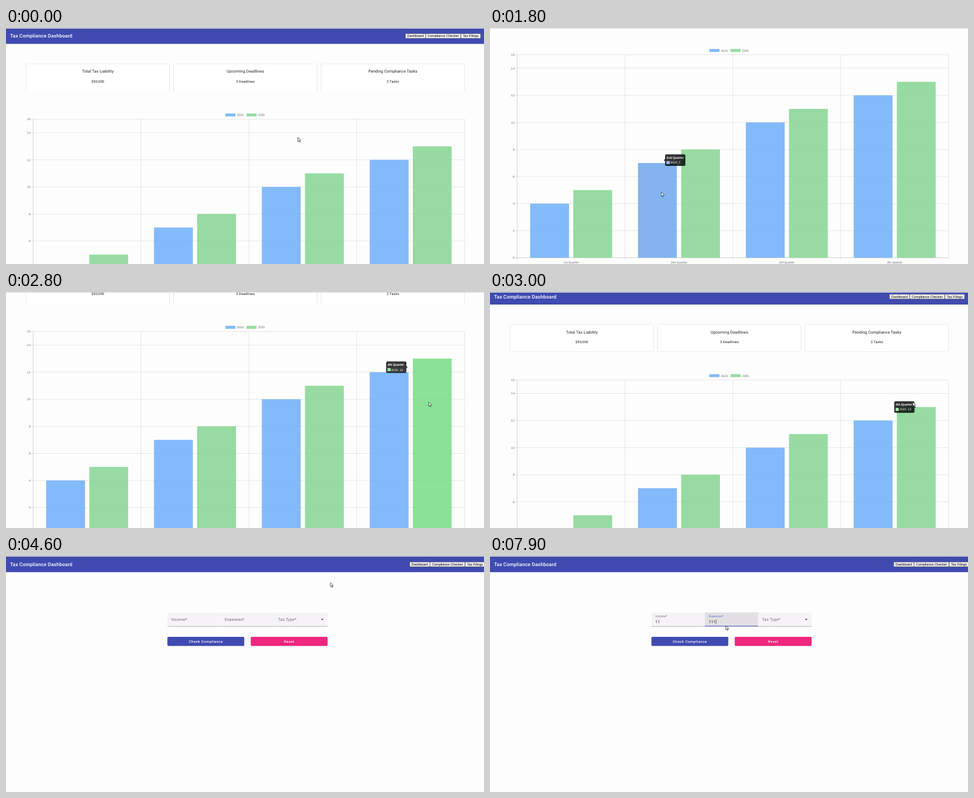
An HTML page for the animation above (8000 ms loop, 800 px wide and 397 px high).

```html
<!DOCTYPE html>
<html lang="en">
<head>
<meta charset="utf-8">
<title>Tax Compliance Dashboard</title>
<style>
  html, body { margin: 0; width: 100%; height: 100%; overflow: hidden; background: #fefdfe; }
  svg { display: block; width: 100%; height: 100%; }
  text { font-family: Roboto, sans-serif; text-rendering: geometricPrecision; white-space: pre; }
  .mid { text-anchor: middle; }
  .brand { font-size: 8.33px; font-weight: 500; letter-spacing: .1px; fill: #fff; }
  .nav, .tick, .tip { font-family: "Liberation Sans", Arial, sans-serif; }
  .nav { font-size: 5.6px; fill: #000; }
  .head { font-size: 6.67px; letter-spacing: .09px; fill: #1c1c1c; }
  .fact { font-size: 5.83px; letter-spacing: .104px; fill: #1c1c1c; }
  .tick { font-size: 5.1px; fill: #666; }
  .tip { font-size: 5.1px; fill: #fff; }
  .field { font-size: 6.67px; letter-spacing: .208px; }
  .action { font-size: 5.83px; font-weight: 500; letter-spacing: .52px; fill: #fff; }
  .card { fill: #fff; filter: drop-shadow(0 .6px .5px rgba(0,0,0,.34)); }
  .raised { filter: drop-shadow(0 .5px .5px rgba(0,0,0,.3)); }
  .grid { stroke: rgba(0,0,0,.09); }
  .axis { stroke: rgba(0,0,0,.16); }
</style>
</head>
<body>
<svg id="stage" viewBox="0 0 800 397"></svg>
<script>
const LOOP = 8000, STEP = 100;
const INDIGO = '#3f4bb0';
const stage = document.getElementById('stage');

function add(parent, tag, attrs = {}, text) {
  const node = document.createElementNS('http://www.w3.org/2000/svg', tag);
  set(node, attrs);
  if (text !== undefined) node.textContent = text;
  return parent.appendChild(node);
}
function set(node, attrs) {
  for (const key in attrs) node.setAttribute(key, attrs[key]);
}
const box = (parent, x, y, width, height, attrs) =>
  add(parent, 'rect', { x, y, width, height, ...attrs });
const label = (parent, x, y, cls, text, attrs) =>
  add(parent, 'text', { x, y, class: cls, ...attrs }, text);
const line = (parent, x1, y1, x2, y2, cls) =>
  add(parent, 'line', { x1, y1, x2, y2, class: cls });
const show = (node, on) => set(node, { visibility: on ? 'visible' : 'hidden' });

const clamp = v => Math.max(0, Math.min(1, v));
const lerp = (a, b, p) => a + (b - a) * p;
const outQuart = p => 1 - (1 - clamp(p)) ** 4;
const smooth = p => (p = clamp(p), p * p * (3 - 2 * p));

// Dashboard
const dash = add(stage, 'g');
[['Total Tax Liability', '$50,000'],
 ['Upcoming Deadlines', '3 Deadlines'],
 ['Pending Compliance Tasks', '2 Tasks']].forEach(([head, fact], i) => {
  const x = 33.6 + i * 246.9;
  box(dash, x, 60.8, 240, 45.6, { rx: 1.7, class: 'card' });
  label(dash, x + 120.1, 75.9, 'head mid', head);
  label(dash, x + 120.1, 92.4, 'fact mid', fact);
});

// Chart
const LEFT = 45.4, RIGHT = 767.4, BAND = 180.5, ZERO = 495.5;
const valueY = v => ZERO - v * 22.77;
const series = [
  { name: '2024', data: [4, 7, 10, 12], fill: 'rgba(100,171,251,.8)', hover: 'rgba(100,163,235,.8)' },
  { name: '2025', data: [5, 8, 11, 13], fill: 'rgba(126,212,139,.8)', hover: 'rgba(108,220,124,.8)' }
];
const quarters = ['1st', '2nd', '3rd', '4th'].map(n => n + ' Quarter');

[0, 2, 4, 6, 8, 10, 12, 14, 15].forEach(v => {
  line(dash, LEFT - 3.5, valueY(v), RIGHT, valueY(v), v ? 'grid' : 'axis');
  label(dash, 41, valueY(v) + 1.8, 'tick', v, { 'text-anchor': 'end' });
});
for (let i = 0; i <= 4; i++) {
  const x = LEFT + i * BAND;
  line(dash, x, valueY(15), x, ZERO + 3.5, i ? 'grid' : 'axis');
}
quarters.forEach((name, i) => label(dash, 135.8 + i * BAND, 504.9, 'tick mid', name));

const barX = (q, s) => 67.2 + q * BAND + s * 72.2;
const bars = series.map((item, s) => {
  box(dash, 367.2 + s * 35.4, 144.3, 16.8, 5, { fill: item.fill });
  label(dash, 386.4 + s * 35.4, 148.6, 'tick', item.name);
  return item.data.map((v, q) => box(dash, barX(q, s), valueY(v), 65, ZERO - valueY(v)));
});

// Tooltip
const TIP_W = 34, TIP_H = 19.6;
const tip = add(dash, 'g');
const TIP_FILL = 'rgba(0,0,0,.8)';
box(tip, 0, 0, TIP_W, TIP_H, { rx: 2.5, fill: TIP_FILL });
const beak = add(tip, 'path', { fill: TIP_FILL });
const tipHead = label(tip, 2.5, 7.2, 'tip', '', { 'font-weight': 700 });
box(tip, 2.5, 11.4, 5, 5, { fill: '#fff' });
const swatch = box(tip, 2.9, 11.8, 4.2, 4.2);
const tipBody = label(tip, 8.4, 15.8, 'tip', '');

// start, end, quarter, series
const hovers = [
  [780, 1606, 2, 0], [1606, 1906, 1, 0], [1906, 2106, 0, 0], [2606, 3000, 3, 1]
];
const onLeft = q => q > 1;
function tipSpot(q, s) {
  const x = barX(q, s) + 32.5;
  return [onLeft(q) ? x - 2.9 - TIP_W : x + 2.9, valueY(series[s].data[q]) - TIP_H / 2];
}

function drawChart(t) {
  let spot = tipSpot(3, 1), current = -1;
  hovers.forEach(([start, , q, s], i) => {
    if (t < start) return;
    current = i;
    const until = i + 1 < hovers.length ? Math.min(t, hovers[i + 1][0]) : t;
    const p = outQuart((until - start) / 400);
    spot = tipSpot(q, s).map((v, k) => lerp(spot[k], v, p));
  });
  const visible = t >= 900 && current >= 0;
  show(tip, visible);
  const [start, end, q, s] = hovers[Math.max(0, current)];
  const active = visible && t < end;
  bars.forEach((row, j) => row.forEach((bar, k) =>
    set(bar, { fill: active && j === s && k === q ? series[j].hover : series[j].fill })));
  if (!visible) return;

  const joined = current > 0 && hovers[current - 1][1] === start;
  const fadeIn = joined ? 1 : clamp((t - start) / 200);
  set(tip, {
    transform: `translate(${spot})`,
    opacity: fadeIn * (1 - clamp((t - end) / 200))
  });
  const edge = onLeft(q) ? TIP_W : 0, dir = onLeft(q) ? 2.1 : -2.1;
  set(beak, { d: `M${edge} 7.7l${dir} 2.1l${-dir} 2.1z` });
  tipHead.textContent = quarters[q];
  tipBody.textContent = `${series[s].name}: ${series[s].data[q]}`;
  set(swatch, { fill: series[s].hover });
}

// Form
const form = add(stage, 'g');
const FIELD_W = 89.3;
const fields = ['Income*', 'Expenses*', 'Tax Type*'].map((name, i) => {
  const x = 270.2 + i * FIELD_W;
  return {
    x,
    back: add(form, 'path', {
      d: `M${x} 118.4V${i ? 95 : 96.7}${i ? '' : 'q0 -1.7 1.7 -1.7'}H${x + FIELD_W}V118.4z`
    }),
    rule: box(form, x, 118, FIELD_W, 0.6),
    name: label(form, 0, 0, 'field', name),
    value: label(form, x + 6.6, 112.5, 'field', '', { fill: '#222' })
  };
});
add(form, 'path', { d: 'M527 105.8h4.6l-2.3 2.4z', fill: '#555' });
const caret = box(form, 0, 106.4, 0.6, 8, { fill: '#333' });
[['Check Compliance', 270.2, INDIGO], ['Reset', 409.7, '#f0267f']].forEach(([name, x, fill]) => {
  box(form, x, 136.1, 128.5, 15.2, { rx: 1.7, fill, class: 'raised' });
  label(form, x + 64.4, 145.5, 'action mid', name);
});

function drawField(f, raise, focus, hover, value) {
  set(f.back, { fill: focus ? '#e2e0e2' : hover ? '#ebe9eb' : '#f5f3f5' });
  set(f.rule, {
    fill: focus ? INDIGO : '#929092',
    y: focus ? 117.5 : 118,
    height: focus ? 1 : 0.6
  });
  set(f.name, {
    transform: `translate(${f.x + 6.5} ${lerp(109.2, 102.7, raise)}) scale(${lerp(1, 0.75, raise)})`,
    fill: focus ? '#5560bf' : '#69676a'
  });
  f.value.textContent = value;
}

const typed = (t, times) => '1'.repeat(times.filter(at => t >= at).length);

function drawForm(t) {
  const income = typed(t, [6500, 6700]);
  const costs = typed(t, [7400, 7700, 7900]);
  const first = t >= 5100 && t < 7200, second = t >= 7200;
  drawField(fields[0], smooth((t - 5050) / 150), first, t >= 4900 && t < 7000, income);
  drawField(fields[1], smooth((t - 7150) / 150), second, t >= 7000, costs);
  drawField(fields[2], 0, false, false, '');
  const f = fields[second ? 1 : 0];
  set(caret, { x: f.x + 6.9 + (second ? costs : income).length * 3.95 });
  show(caret, t >= 6000);
}

// Header
const header = add(stage, 'g');
box(header, 0, 0, 800, 27.2, { fill: INDIGO });
label(header, 6.8, 16.9, 'brand', 'Tax Compliance Dashboard');
const nav = add(header, 'g');
[['Dashboard', 668.6, 33.7], ['Compliance Checker', 702.5, 58.6], ['Tax Filings', 761.3, 33]]
  .forEach(([name, x, w]) => {
    box(nav, x, 9.9, w, 8, { rx: 0.8, fill: '#efefef', stroke: '#55555c', 'stroke-width': 0.7 });
    label(nav, x + w / 2, 15.9, 'nav mid', name);
  });
box(stage, 0, 0, 800, 1, { fill: '#dddde2' });

// Pointer: time, x, y
const pointer = add(stage, 'path', {
  d: 'M0 0V7.1L1.6 5.6L2.7 8.1L3.8 7.6L2.7 5.2H5z',
  fill: '#fff', stroke: '#222', 'stroke-width': 0.7, 'stroke-linejoin': 'round'
});
const path = [
  [0, 488.6, 184], [800, 488.6, 184], [900, 487.8, 182.3], [1500, 487.8, 182.3],
  [1600, 335, 250], [1700, 300, 270], [1800, 286.8, 276], [1900, 150, 330],
  [2000, 90, 345], [2100, 150, 220], [2200, 330, 70], [2300, 560, 40],
  [2400, 735, 70], [2600, 712, 150], [2800, 707.5, 185], [3300, 707.5, 185],
  [3600, 722, 95], [3900, 733, 18], [4000, 732, 14], [4300, 732, 14],
  [4700, 480, 55], [5000, 310, 98], [5200, 302.7, 103], [6400, 302.7, 103],
  [6500, 312, 110], [6600, 312, 110], [6700, 343, 122], [6800, 343, 122],
  [7100, 398, 108], [7400, 394.7, 117], [8000, 394.7, 117]
];
function drawPointer(t) {
  const i = path.findIndex(key => key[0] > t);
  const [t0, x0, y0] = path[i - 1], [t1, x1, y1] = path[i];
  const p = (t - t0) / (t1 - t0);
  set(pointer, { transform: `translate(${lerp(x0, x1, p)} ${lerp(y0, y1, p)})` });
}

function scrollAt(t) {
  if (t < 900) return Math.max(0, 0.5 - t / 400);
  return 109 * (1 - smooth((t - 2700) / 350));
}

function draw(t) {
  const onForm = t >= 4100;
  const scroll = onForm ? 0 : scrollAt(t);
  dash.style.display = onForm ? 'none' : '';
  form.style.display = onForm ? '' : 'none';
  set(dash, { transform: `translate(0 ${-scroll})` });
  set(header, { transform: `translate(0 ${-scroll})` });
  set(nav, { transform: `translate(${onForm ? 7.1 : 0} ${onForm ? 0.2 : 0})` });
  if (onForm) drawForm(t); else drawChart(t);
  drawPointer(t);
}

const began = performance.now();
function tick() {
  const t = (performance.now() - began) % LOOP;
  draw(Math.floor(t / STEP) * STEP);
  requestAnimationFrame(tick);
}
tick();
</script>
</body>
</html>
```
